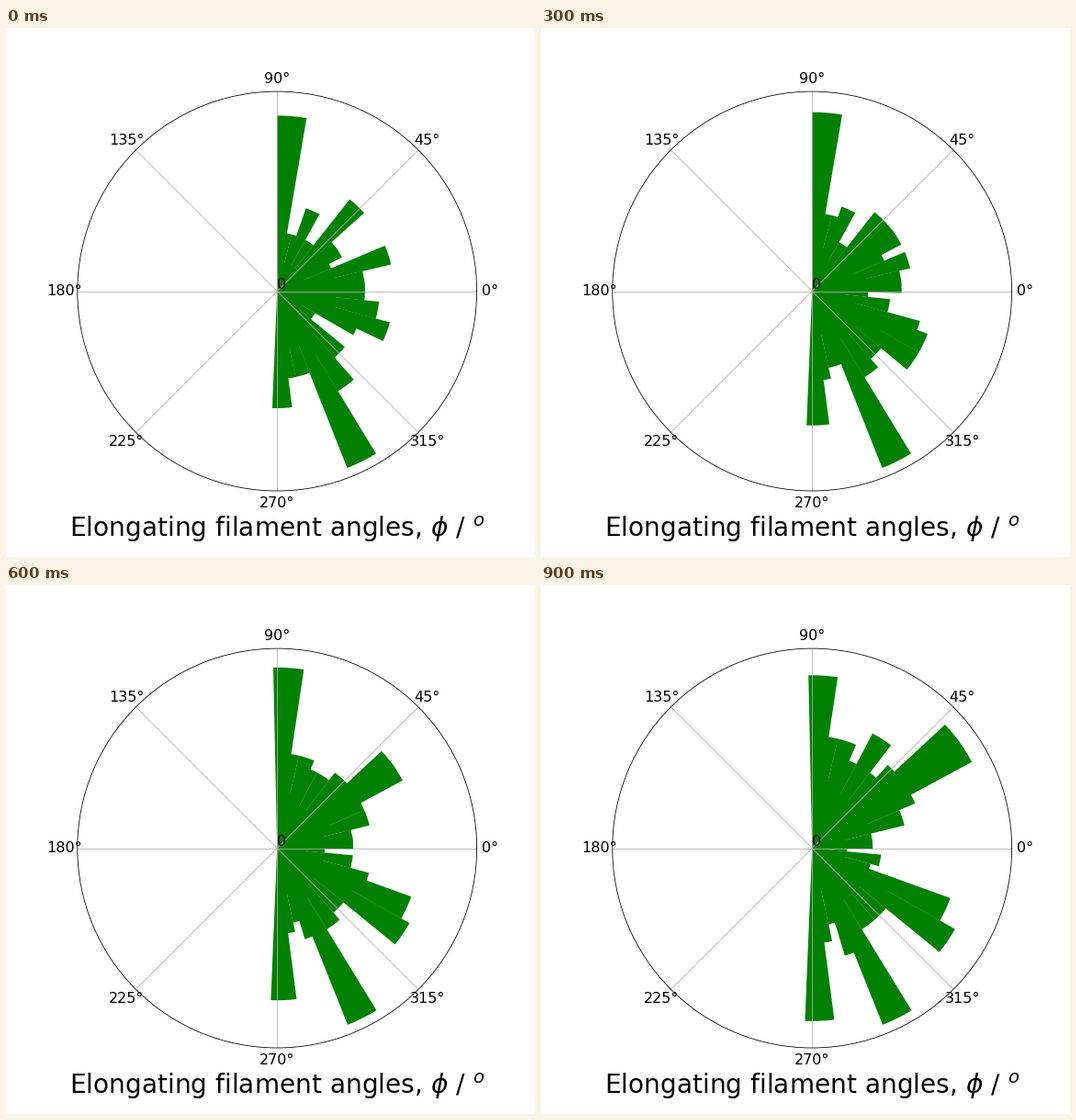
Recreate the animation shown at these times as a matplotlib script. Size 576 by 576 pixels, loop 1 s.

```python
import numpy as np
import matplotlib.pyplot as plt
from matplotlib.animation import FuncAnimation

FRAMES, INTERVAL = 10, 100
BARS = 37
BAR_WIDTH = 2 * np.pi / BARS
LONGEST = 5  # this bar always sets the radial scale

# Bars that grow alike: bins, first count, last count, swell halfway.
growth = [
    ([0], 8, 20, 0),
    ([1, 9, 32], 6, 11, 0),
    ([3], 6, 9, 0),
    ([4, 24, 27, 33, 35], 4, 13, 0),
    ([7, 22, 28], 8, 11, 0),
    ([11], 3, 19, 3),
    ([13], 6, 17, 2),
    ([14], 8, 7, 3),
    ([16], 7, 8, 0),
    ([18], 6, 4, 0),
    ([19, 20], 6, 7, 2),
    ([25, 26], 5, 21, -1),
    ([30], 4, 15, -3),
    ([36], 12, 20, 2),
]


def counts_at(step):
    t = step / (FRAMES - 1)
    counts = np.zeros(BARS)
    for bins, first, last, swell in growth:
        counts[bins] = np.rint(first + (last - first) * t + swell * np.sin(np.pi * t))
    counts[LONGEST] = np.ceil(13 + 9 * min(step / 8, 1))
    # The remaining bars are valleys, lower than both neighbours.
    for k in np.flatnonzero(counts == 0):
        counts[k] = np.rint(0.6 * min(counts[k - 1], counts[k + 1]))
    return counts


def angles_at(step):
    last_angle = np.interp(step, [3, 4.2], [85.2, 86.35])
    return np.radians(np.linspace(-87.5, last_angle, BARS))


fig = plt.figure(figsize=(8, 8), dpi=72, facecolor="white")
fig.subplots_adjust(left=0.125, right=0.9, bottom=0.125, top=0.88)
ax = fig.add_subplot(projection="polar")
bars = ax.bar(angles_at(0), counts_at(0), width=BAR_WIDTH, color="green")
ax.set_yticks([0])
ax.tick_params(labelsize=16)
ax.set_xlabel(r"Elongating filament angles, $\phi$ / $^o$", fontsize=28)


def update(step):
    counts = counts_at(step)
    for bar, angle, count in zip(bars, angles_at(step), counts):
        bar.set_x(angle - BAR_WIDTH / 2)
        bar.set_height(count)
    ax.set_ylim(0, 1.05 * counts.max())
    return bars


animation = FuncAnimation(fig, update, frames=FRAMES, interval=INTERVAL,
                          repeat=True, repeat_delay=0, blit=False)
plt.show()
```
